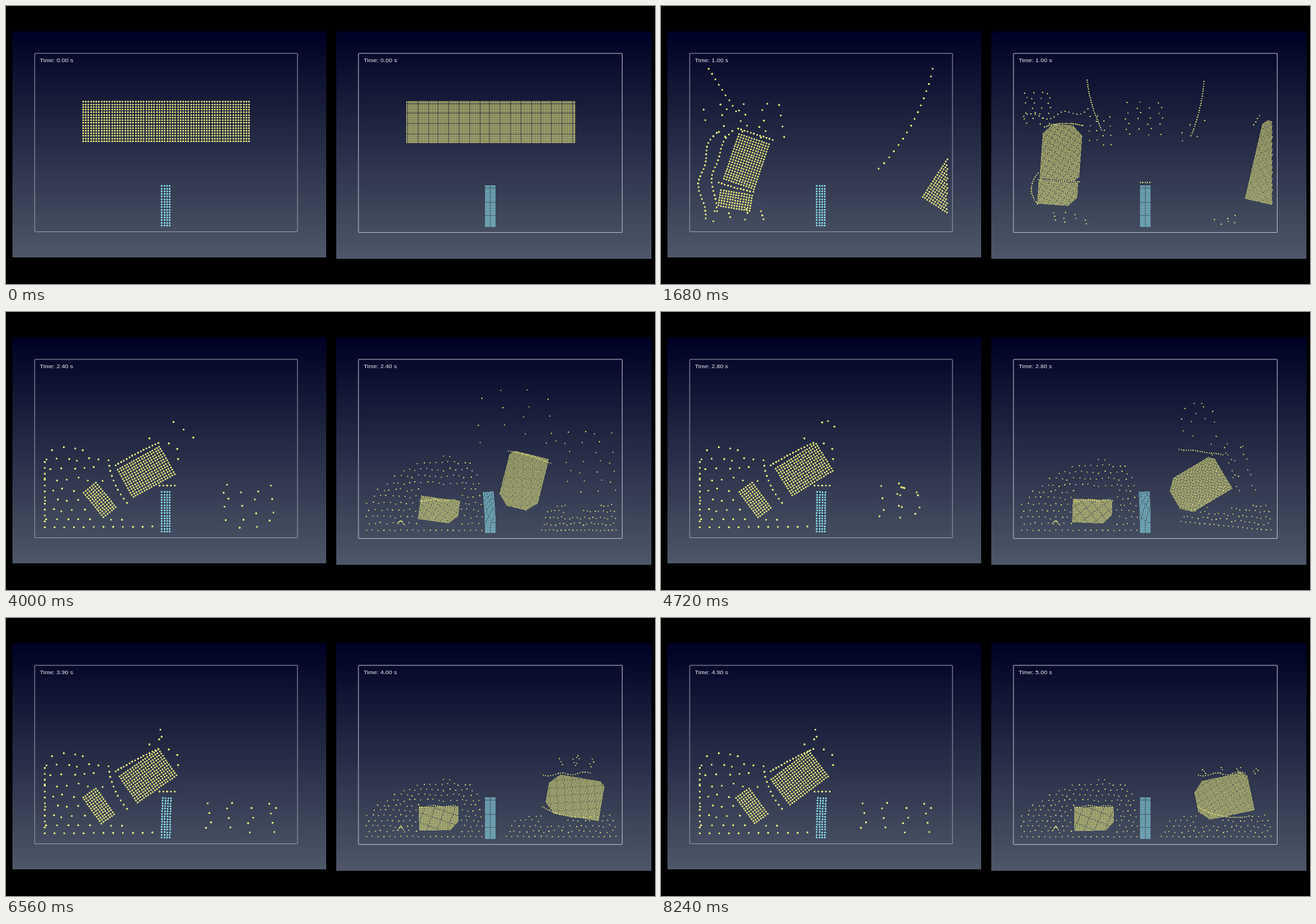
Animation of 900 by 386 pixels, one loop 8320 ms. Source, as a matplotlib script:

```python
import numpy as np
import matplotlib.pyplot as plt
from matplotlib.animation import FuncAnimation
from matplotlib.patches import FancyBboxPatch

W, H, DPI = 900, 386, 100
FRAMES, STEP = 104, 80
HIT, DROP = 0.5, 58          # moment of impact and height fallen by then
FLOOR = 303
SNAP = 0.585                 # grains sit on a fine raster, which gives the weave
YELLOW, BLUE = (0.93, 0.93, 0.5), (0.56, 0.9, 0.95)
LOOSE_T = np.array([HIT, 1.0, 1.7, 2.4, 3.3, 4.3])
rng = np.random.default_rng(7)


def hermite(t, ts, vals):
    """Smooth path through keyed values, clamped at both ends."""
    t = min(max(t, ts[0]), ts[-1])
    i = min(np.searchsorted(ts, t, side="right") - 1, len(ts) - 2)
    m = np.gradient(vals, ts, axis=0)
    h = ts[i + 1] - ts[i]
    u = (t - ts[i]) / h
    return ((1 + 2 * u) * (1 - u) ** 2 * vals[i] + u * (1 - u) ** 2 * h * m[i]
            + u * u * (3 - 2 * u) * vals[i + 1] + u * u * (u - 1) * h * m[i + 1])


def arc(n, a, b, bow=0, wave=0):
    """n grains strung from a to b, bowed or rippled sideways."""
    a, b = np.array(a, float), np.array(b, float)
    u = np.linspace(0, 1, n)[:, None]
    d = b - a
    side = np.array([-d[1], d[0]]) / np.hypot(*d)
    return a + d * u + side * (4 * bow * u * (1 - u) + wave * np.sin(4 * np.pi * u))


def cloud(n, x0, x1, y0, y1):
    """Evenly spread scatter from a quasi-random sequence."""
    i = np.arange(n) + rng.integers(1, 40)
    u, v = i * 0.7548777 % 1, i * 0.5698403 % 1
    return np.c_[x0 + (x1 - x0) * u, y0 + (y1 - y0) * v]


def heap(outline, dx=8.0, dy=7.2, floor=FLOOR):
    """Rows of grains resting on the floor under an outline."""
    ox, oy = np.array(outline, float).T
    rows = []
    for k, y in enumerate(np.arange(floor, oy.min(), -dy)):
        x = np.arange(ox[0] + (k % 2) * dx / 2, ox[-1], dx)
        jitter = rng.uniform(-0.2, 0.2, (2, len(x))) * (dx if k else dx / 4)
        rows.append(np.c_[x + jitter[0], y + jitter[1]])
    p = np.vstack(rows)
    return p[p[:, 1] >= np.interp(p[:, 0], ox, oy)]


def stretch(p, origin, factor):
    return np.array(origin) + (p - origin) * factor


class Piece:
    """Rigid part of the slab: a lattice range with cut corners."""

    def __init__(self, cells, grid, span, cuts, keys):
        c0, c1, r0, r1 = span
        inside = ((cells[:, 0] >= c0) & (cells[:, 0] < c1)
                  & (cells[:, 1] >= r0) & (cells[:, 1] < r1))
        lo, hi = grid[inside].min(0), grid[inside].max(0)
        mid, self.half = (lo + hi) / 2, (hi - lo) / 2
        loc = grid - mid
        edge = (self.half - abs(loc)).sum(1)
        for sx, sy, size in cuts:
            inside &= ~((loc[:, 0] * sx > 0) & (loc[:, 1] * sy > 0) & (edge < size))
        self.mask, self.loc = inside, loc[inside]
        k = np.array([(HIT, mid[0], mid[1] + DROP, 0)] + keys, float)
        self.ts, self.vals = k[:, 0], k[:, 1:]

    def pose(self, t):
        x, y, a = hermite(t, self.ts, self.vals)
        return x, y, np.cos(np.radians(a)), np.sin(np.radians(a))

    def place(self, t):
        x, y, c, s = self.pose(t)
        lx, ly = self.loc.T
        return np.c_[x + lx * c + ly * s, y - lx * s + ly * c]

    def clear(self, p, t, pad=4):
        """Drop grains that lie inside the piece."""
        x, y, c, s = self.pose(t)
        dx, dy = p[:, 0] - x, p[:, 1] - y
        hit = ((abs(dx * c - dy * s) < self.half[0] + pad)
               & (abs(dx * s + dy * c) < self.half[1] + pad))
        return p[~hit]


class Panel:
    def __init__(self, origin, d, n, spans, column, bend, rate, wall, size):
        self.rate, self.wall = rate, wall
        cells = np.array([(i, j) for i in range(4 * n) for j in range(n)])
        self.grid = np.array(origin) + cells * d
        self.pieces = [Piece(cells, self.grid, *s) for s in spans]
        pool = self.grid[~np.any([p.mask for p in self.pieces], axis=0)]
        self.pool = pool[np.argsort(pool[:, 0], kind="stable")]
        self.base = np.array([(i, j) for i in range(n // 4) for j in range(n)]) * column[2:]
        self.base = self.base + column[:2]
        self.bend = np.array(bend, float)
        a, b = len(self.grid), len(self.base)
        self.art = ax.scatter(np.zeros(a + b), np.zeros(a + b), s=(size * 0.72) ** 2,
                              c=[YELLOW] * a + [BLUE] * b, linewidths=0)

    def around(self, p, t):
        for piece in self.pieces:
            p = piece.clear(p, t)
        return p

    def set_loose(self, *sets):
        """Match every free grain with a place in each keyed arrangement."""
        n, last = len(self.pool), -1
        self.keys = [self.pool + (0, DROP)]
        for parts in sets:
            p = np.vstack(parts)
            if len(p) != last:
                order, last = np.argsort(p[:, 0], kind="stable"), len(p)
            self.keys.append(p[order][np.arange(n) * len(p) // n])

    def loose(self, t):
        t = min(t, LOOSE_T[-1])
        i = min(np.searchsorted(LOOSE_T, t, side="right") - 1, len(LOOSE_T) - 2)
        u = (t - LOOSE_T[i]) / (LOOSE_T[i + 1] - LOOSE_T[i])
        a, b = self.keys[i], self.keys[i + 1]
        p = a + (b - a) * u
        p[:, 1] -= 4 * u * (1 - u) * np.minimum(28, np.hypot(*(b - a).T) / 4)
        return p

    def column(self, t):
        x, y = self.base.T
        tall = np.ptp(y)
        b = np.interp(t, *self.bend.T)
        h = (y.max() - y) / tall
        return np.c_[x + b * h * h, y + (x - x.mean()) * 2 * b * h / tall + abs(b) * 0.15 * h]

    def draw(self, frame):
        t = np.floor(frame * self.rate * 10) / 10
        if t <= HIT:
            slab = self.grid + (0, DROP * (t / HIT) ** 2)
        else:
            slab = np.vstack([p.place(t) for p in self.pieces] + [self.loose(t)])
            slab[slab[:, 0] > self.wall] = (-50, -50)
        grains = np.vstack([slab, self.column(t)])
        self.art.set_offsets(np.round(grains / SNAP) * SNAP)
        return f"Time: {t:.2f} s"


def gradient(img, x0, x1, y0, y1):
    u = np.linspace(0, 1, y1 - y0)[:, None]
    top, low = np.array([0, 1, 37]), np.array([78, 88, 104])
    img[y0:y1, x0:x1] = ((top + (low - top) * u) / 255)[:, None]


fig = plt.figure(figsize=(W / DPI, H / DPI), dpi=DPI, facecolor="black")
ax = fig.add_axes([0, 0, 1, 1])
back = np.zeros((H, W, 3))
gradient(back, 9, 444, 35, 349)
gradient(back, 458, 895, 35, 351)
ax.imshow(back, extent=(0, W, H, 0), aspect="auto", interpolation="nearest")
ax.set_xlim(0, W)
ax.set_ylim(H, 0)
ax.axis("off")

for x, w, h, tint in [(39.8, 364.4, 247.6, 0.58), (488.8, 365.8, 248.6, 0.7)]:
    ax.add_patch(FancyBboxPatch((x, 65.8), w, h, boxstyle="round,pad=0,rounding_size=1.2",
                                fc="none", ec=(tint, tint + 0.02, tint + 0.07), lw=0.66))
labels = [ax.text(x, 76, "", color=(0.9, 0.91, 0.95), fontsize=8.4 * 0.72,
                  family="Liberation Sans", va="center") for x in (47, 496)]

# Piece keys: time, centre x, centre y, turn in degrees
coarse = Panel(
    (107, 133), 3.65, 16,
    [((13, 32, 1, 14), [],
      [(1.0, 118.5, 216, 71), (1.7, 181, 232, 22.5), (2.4, 194.5, 222, 29), (4.9, 192, 222, 37)]),
     ((3, 10, 1, 14), [],
      [(1.0, 103, 270, 80), (1.7, 128, 261, 48), (2.4, 130, 261, 39), (4.9, 126, 261, 36)]),
     ((33, 64, 0, 16), [], [(1.0, 416, 234, -123), (1.3, 510, 255, -190)])],
    (216, 250, 3.75, 3.65),
    [(1.0, 0), (1.7, 3), (2.4, 0), (3.3, 1.5)],
    0.04854, 397.5, 2.45)

fine = Panel(
    (556, 133), 1.83, 32,
    [((22, 64, 1, 31), [(1, -1, 11), (1, 1, 12), (-1, 1, 4)],
      [(1.0, 555, 203, 86), (1.7, 674, 216, 38), (2.4, 717, 235, -104),
       (3.3, 777, 246, -180), (5.0, 780, 248, -168)]),
     ((2, 20, 1, 31), [(-1, 1, 10)],
      [(1.0, 550, 260, 86), (1.7, 623, 269, 49), (2.4, 600.5, 275, 82), (3.3, 600, 277.5, 89),
       (5.0, 600.5, 279, 91)]),
     ((66, 128, 0, 32), [(-1, 1, 5)], [(1.0, 851, 219, -103), (1.3, 945, 240, -140)])],
    (665, 250, 1.9, 1.81),
    [(1.0, 0), (1.7, 19), (2.4, -3), (3.3, 0)],
    0.0488, 847.5, 1.5)

# Loose grains of the coarse panel
burst = [
    arc(9, (66, 87), (104, 146)),
    arc(24, (77, 176), (62, 295), 14, 3),
    arc(22, (99, 174), (78, 285), 15, 2),
    arc(12, (80, 245), (128, 258), 1),
    arc(12, (107, 170), (155, 186)),
    arc(16, (377, 87), (302, 226), -11),
    coarse.around(cloud(24, 58, 172, 133, 186), 1.0),
    cloud(10, 60, 150, 280, 300),
]
scatter = [
    arc(8, (65, 108), (104, 160), 3),
    arc(13, (104, 163), (82, 250), -6, 3),
    arc(18, (68, 186), (53, 292), 5),
    arc(14, (139, 216), (163, 263), 9),
    arc(14, (140, 213), (200, 196)),
    arc(7, (216, 199), (241, 240)),
    coarse.around(cloud(14, 160, 258, 112, 196), 1.7),
    coarse.around(cloud(24, 58, 118, 148, 300), 1.7),
    cloud(9, 258, 382, 185, 300),
    cloud(7, 100, 206, 282, 300),
]
pile = [
    arc(12, (54, 208), (54, 299)),
    arc(11, (67, 299), (203, 298)),
    arc(10, (142, 206), (168, 265), 5),
    arc(16, (152, 213), (211, 182), -1),
    arc(5, (213, 241), (234, 241)),
    coarse.around(heap([(56, 178), (88, 182), (136, 192), (142, 240), (166, 285)],
                       15, 14, 288), 3.3),
    coarse.around(cloud(10, 188, 240, 172, 222), 3.3),
]
fly = [cloud(3, 212, 268, 150, 175), cloud(17, 300, 385, 232, 300)]
land = [cloud(3, 209, 217, 153, 176), cloud(17, 270, 390, 252, 299)]
coarse.set_loose(burst, scatter, pile + fly, pile + land, pile + land)

# Loose grains of the fine panel
burst = [
    arc(24, (591, 103), (611, 172), 3),
    arc(24, (753, 105), (735, 180), -3),
    arc(18, (503, 153), (592, 143), 4, -4),
    arc(22, (532, 168), (585, 166), -4),
    arc(22, (523, 241), (580, 244)),
    arc(16, (523, 232), (522, 275), 9),
    arc(5, (665, 245), (678, 245)),
    arc(4, (822, 165), (830, 152)),
    cloud(24, 501, 545, 115, 165),
    cloud(16, 592, 630, 148, 194),
    cloud(22, 642, 702, 128, 180),
    cloud(5, 715, 757, 156, 195),
    cloud(10, 540, 598, 285, 303),
    cloud(6, 766, 804, 289, 303),
]
scatter = [
    cloud(34, 562, 606, 95, 165),
    cloud(14, 505, 640, 105, 172),
    fine.around(cloud(40, 642, 730, 123, 200), 1.7),
    fine.around(cloud(30, 715, 772, 195, 285), 1.7),
    fine.around(heap([(503, 300), (525, 272), (560, 240), (590, 222), (620, 215), (650, 270)],
                     11, 10), 1.7),
    cloud(12, 730, 846, 286, 304),
    arc(24, (631, 212), (680, 173)),
    arc(14, (680, 173), (717, 202), -2),
    arc(14, (629, 222), (658, 259), 3),
    arc(22, (837, 226), (797, 300), -6),
]
left = fine.around(heap([(500, 274), (522, 249), (560, 233), (612, 222), (650, 230),
                         (662, 262)]), 4.0)
right = fine.around(heap([(694, 298), (702, 282), (742, 268), (841, 270), (848, 288)]), 4.9)
ring = arc(8, (544, 294), (551, 294), -4)
crust = arc(18, (574, 262), (626, 262), -1, 1)


def resting(sink, sky):
    return [left + (0, sink), right + (0, sink), ring, crust,
            arc(20, (745, 218), (810, 215), 0, 1.5), cloud(14, 742, 838, sky, 216),
            arc(26, (744, 262), (812, 276), 6)]


tumble = [
    stretch(left, (580, FLOOR), (1, 1.3)),
    stretch(right, (847, FLOOR), (0.68, 1.2)),
    ring, crust,
    arc(20, (697, 193), (755, 210), -2),
    cloud(14, 640, 768, 100, 185),
    cloud(26, 762, 846, 160, 255),
]
fine.set_loose(burst, scatter, tumble, resting(0, 190), resting(0.6, 207))


def update(frame):
    for panel, label in zip((coarse, fine), labels):
        label.set_text(panel.draw(frame))
    return [coarse.art, fine.art, *labels]


anim = FuncAnimation(fig, update, frames=FRAMES, interval=STEP, repeat=True,
                     repeat_delay=0, blit=False)
plt.show()
```
